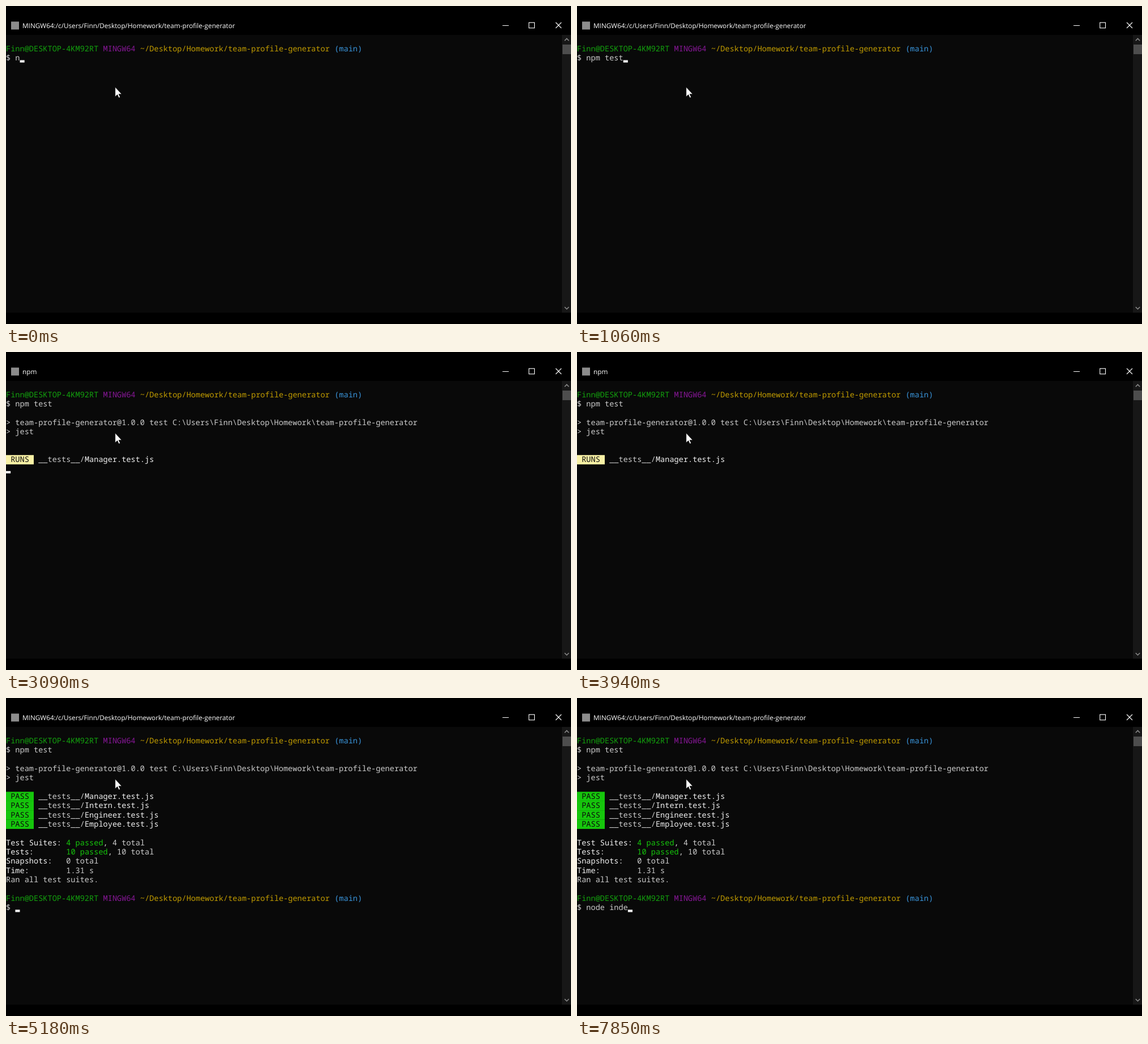
Recreate the animation shown at these times as an HTML page. Size 998x561 px, loop 8 s.

```html
<!DOCTYPE html>
<html lang="en">
<head>
<meta charset="utf-8">
<title>Terminal test run</title>
<style>
  html, body { margin: 0; width: 100%; height: 100%; overflow: hidden; background: #000; }
  svg { display: block; width: 100%; height: 100%; text-rendering: geometricPrecision; }
  #title { font: 11.75px "Open Sans", "Noto Sans", sans-serif; fill: #fff; }
  #screen { font: 13.62px "Noto Sans Mono", "DejaVu Sans Mono", monospace; }
</style>
</head>
<body>
<svg viewBox="0 0 998 561">
  <rect width="998" height="561"/>
  <rect y="51" width="982" height="490" fill="#090909"/>

  <rect x="9" y="27.5" width="14" height="14" fill="#8c8c8c"/>
  <text id="title" x="29" y="39"></text>
  <g fill="none" stroke="#fff" stroke-width="1.1">
    <path d="M877 34.5H888M971 29L981 39M981 29L971 39"/>
    <rect x="923.7" y="29.2" width="9.8" height="9.6"/>
  </g>

  <rect x="982" y="51" width="16" height="490" fill="#171717"/>
  <rect x="983" y="68" width="15" height="17" fill="#4d4d4d"/>
  <path d="M986.8 61.2L990.5 57.5L994.2 61.2M986.8 531L990.5 534.7L994.2 531"
        fill="none" stroke="#8a8a8a" stroke-width="1.6"/>

  <g id="screen"></g>

  <path d="M192.8 143V160L196.7 156.4L199.3 162L201.7 160.9L199.2 155.4H204.4Z"
        fill="#fff" stroke="#000" stroke-width=".7"/>
</svg>

<script>
const LOOP = 8000;
const CELL_W = 8.172, CELL_H = 16.35, TOP = 51;

const GREY = '#cccccc', WHITE = '#f2f2f2', BLACK = '#0c0c0c';
const GREEN = '#13a10e', LIME = '#16c60c', PURPLE = '#881798';
const GOLD = '#c19c00', BLUE = '#3a96dd', CREAM = '#f9f1a5';

const USER = 'Finn', HOST = 'DESKTOP-4KM92RT', PROJECT = 'team-profile-generator';
const SHELL_TITLE = `MINGW64:/c/Users/${USER}/Desktop/Homework/${PROJECT}`;

const T = { enter: 2060, npmTitle: 2230, npm: 2610, runs: 3090, summary: 4500, prompt: 4800, node: 7440 };
const TEST_KEYS = [0, 90, 210, 340, 550, 650, 760, 860];
const PASSES = [['Manager', 4350], ['Intern', 4380], ['Engineer', 4420], ['Employee', 4450]];
const CURSOR_OFF = [[1820, T.enter], [3940, PASSES[0][1]], [5550, 6070], [6620, 7130]];

const title = document.getElementById('title');
const screen = document.getElementById('screen');

const rect = (row, col, cols, dy, h, fill) =>
  `<rect x="${col * CELL_W}" y="${TOP + row * CELL_H + dy}" width="${cols * CELL_W}" height="${h}" fill="${fill}"/>`;

const put = (row, col, str, fill = GREY) =>
  `<text x="${col * CELL_W}" y="${TOP + row * CELL_H + 12.5}" fill="${fill}">${str}</text>`;

const prompt = row =>
  put(row, 0, `${USER}@${HOST}`, GREEN) + put(row, 21, 'MINGW64', PURPLE) +
  put(row, 29, `~/Desktop/Homework/${PROJECT}`, GOLD) + put(row, 71, '(main)', BLUE) +
  put(row + 1, 0, '$');

const testFile = (row, label, color, name) =>
  rect(row, 0, 6, 0, CELL_H + .1, color) + put(row, 1, label, BLACK) +
  put(row, 7, '__tests__/') + put(row, 17, `${name}.test.js`, WHITE);

const tally = (row, label, passed, rest) =>
  put(row, 0, label, WHITE) + put(row, 13, passed, LIME) + put(row, 13 + passed.length, rest);

const summary = () =>
  tally(12, 'Test Suites:', '4 passed', ', 4 total') +
  tally(13, 'Tests:', '10 passed', ', 10 total') +
  put(14, 0, 'Snapshots:', WHITE) + put(14, 13, '0 total') +
  put(15, 0, 'Time:', WHITE) + put(15, 13, '1.31 s') +
  put(16, 0, 'Ran all test suites.');

function draw(t) {
  const typed = 'npm test'.slice(0, TEST_KEYS.filter(k => t >= k).length);
  let out = prompt(1) + put(2, 2, typed);
  let cursor = [2, 2 + typed.length];

  if (t >= T.enter) cursor = [3, 0];
  if (t >= T.npm) {
    out += put(4, 0, `&gt; ${PROJECT}@1.0.0 test C:\\Users\\${USER}\\Desktop\\Homework\\${PROJECT}`) +
      put(5, 0, '&gt; jest');
    cursor = [7, 0];
  }

  const passed = PASSES.filter(([, at]) => t >= at);
  if (passed.length) {
    passed.forEach(([name], i) => out += testFile(7 + i, 'PASS', LIME, name));
    cursor = [8 + passed.length, 0];
  } else if (t >= T.runs) {
    out += testFile(8, 'RUNS', CREAM, 'Manager');
    cursor = [9, 0];
  }

  if (t >= T.summary) {
    out += summary();
    cursor = [17, 0];
  }
  if (t >= T.prompt) {
    const keys = Math.max(0, Math.min(9, Math.floor((t - T.node) / 51) + 1));
    out += prompt(18) + put(19, 2, 'node inde'.slice(0, keys));
    cursor = [19, 2 + keys];
  }

  if (!CURSOR_OFF.some(([from, to]) => t >= from && t < to)) {
    out += rect(cursor[0], cursor[1], 1, 11.8, 4.2, WHITE);
  }
  return out;
}

let shown = '';
function render(t) {
  const name = t >= T.npmTitle && t < T.prompt ? 'npm' : SHELL_TITLE;
  if (title.textContent !== name) title.textContent = name;
  const next = draw(t);
  if (next !== shown) screen.innerHTML = shown = next;
}

const start = performance.now();
function tick() {
  render((performance.now() - start) % LOOP);
  requestAnimationFrame(tick);
}
tick();
</script>
</body>
</html>
```
